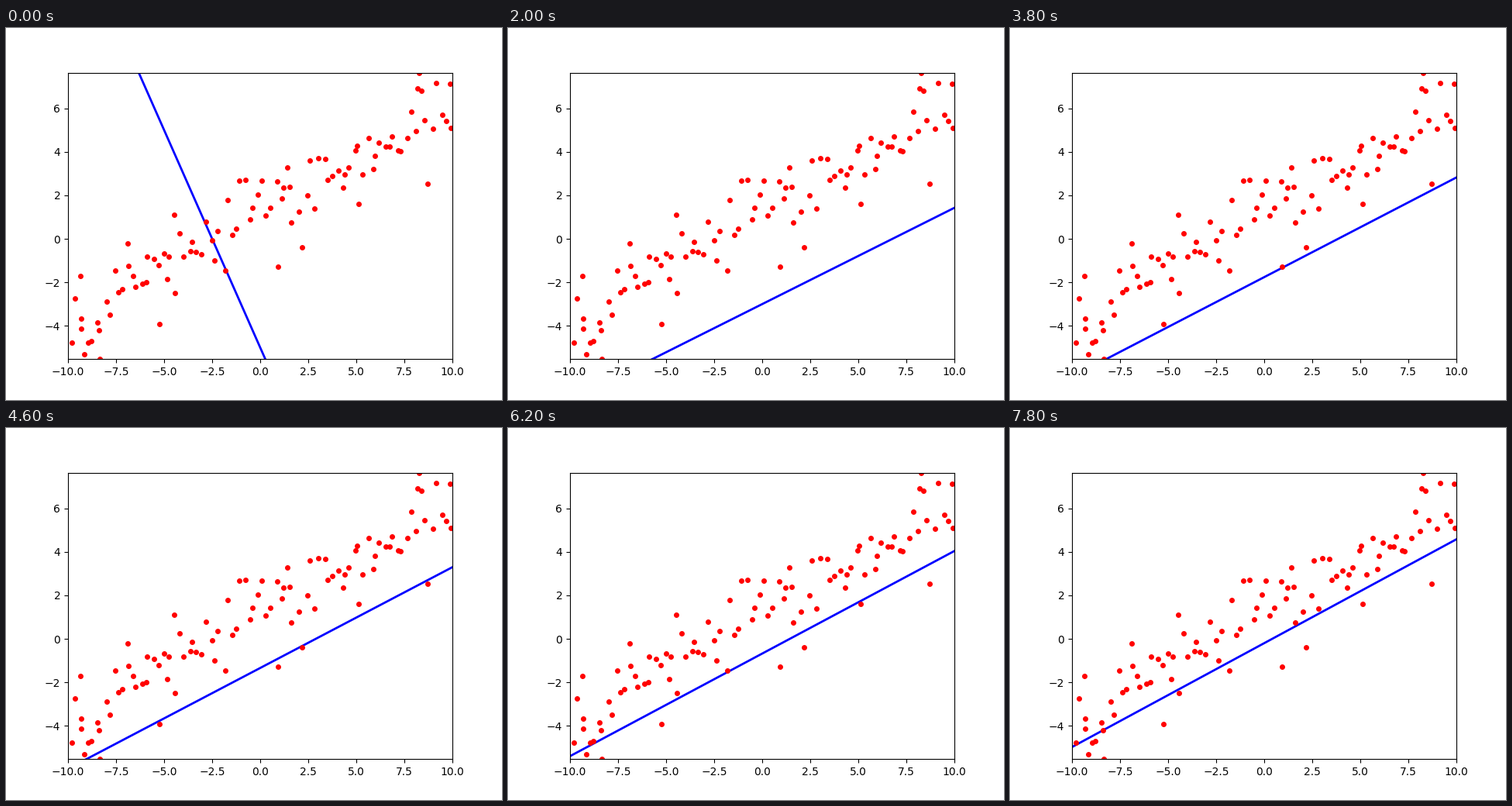
Animation of 640 by 480 pixels, one loop 8 s. Source, as a matplotlib script:

```python
import numpy as np
import matplotlib.pyplot as plt
from matplotlib.animation import FuncAnimation

STEPS = 40
RATE = 0.04
Y_MIN, Y_MAX = -5.53, 7.64

# Best-fit line, and the moments of x that shape the descent
SLOPE, OFFSET = 0.493, 1.047
MEAN_X, MEAN_XX = -0.42, 35.0

# The points furthest from the trend
OUTLIERS = np.array([
    (-9.35, -1.71), (-9.15, -5.31), (-8.33, -5.53), (-6.90, -0.21),
    (-5.24, -3.92), (-4.47, 1.10), (0.93, -1.29), (1.41, 3.27),
    (5.12, 1.60), (8.27, 7.64), (8.39, 6.80), (9.88, 7.12),
])


def make_points(count=100, noise=0.95, seed=4):
    """Evenly spread x with jitter, scattered about the best-fit line."""
    rng = np.random.default_rng(seed)
    n = count - len(OUTLIERS)
    x = -10 + 20 * (np.arange(n) + rng.random(n)) / n
    y = SLOPE * x + OFFSET + rng.normal(0, noise, n)
    return np.vstack([OUTLIERS, np.column_stack([x, y])])


def descend(slope=-2.0, offset=-5.0):
    """Gradient descent on the squared error, one line per step."""
    path = []
    for _ in range(STEPS):
        path.append((slope, offset))
        ds, do = slope - SLOPE, offset - OFFSET
        slope -= RATE * (MEAN_XX * ds + MEAN_X * do)
        offset -= RATE * (MEAN_X * ds + do)
    return path


fig, ax = plt.subplots(figsize=(6.4, 4.8), dpi=100)
ax.set_xlim(-10, 10)
ax.set_ylim(Y_MIN, Y_MAX)

path = descend()
ends = np.array([-10.0, 10.0])
line, = ax.plot([], [], "b-", lw=2)
ax.plot(*make_points().T, "ro", markersize=4)


def draw(i):
    slope, offset = path[i]
    line.set_data(ends, slope * ends + offset)
    return line,


anim = FuncAnimation(fig, draw, frames=STEPS, interval=200,
                     repeat=True, repeat_delay=0)
plt.show()
```
